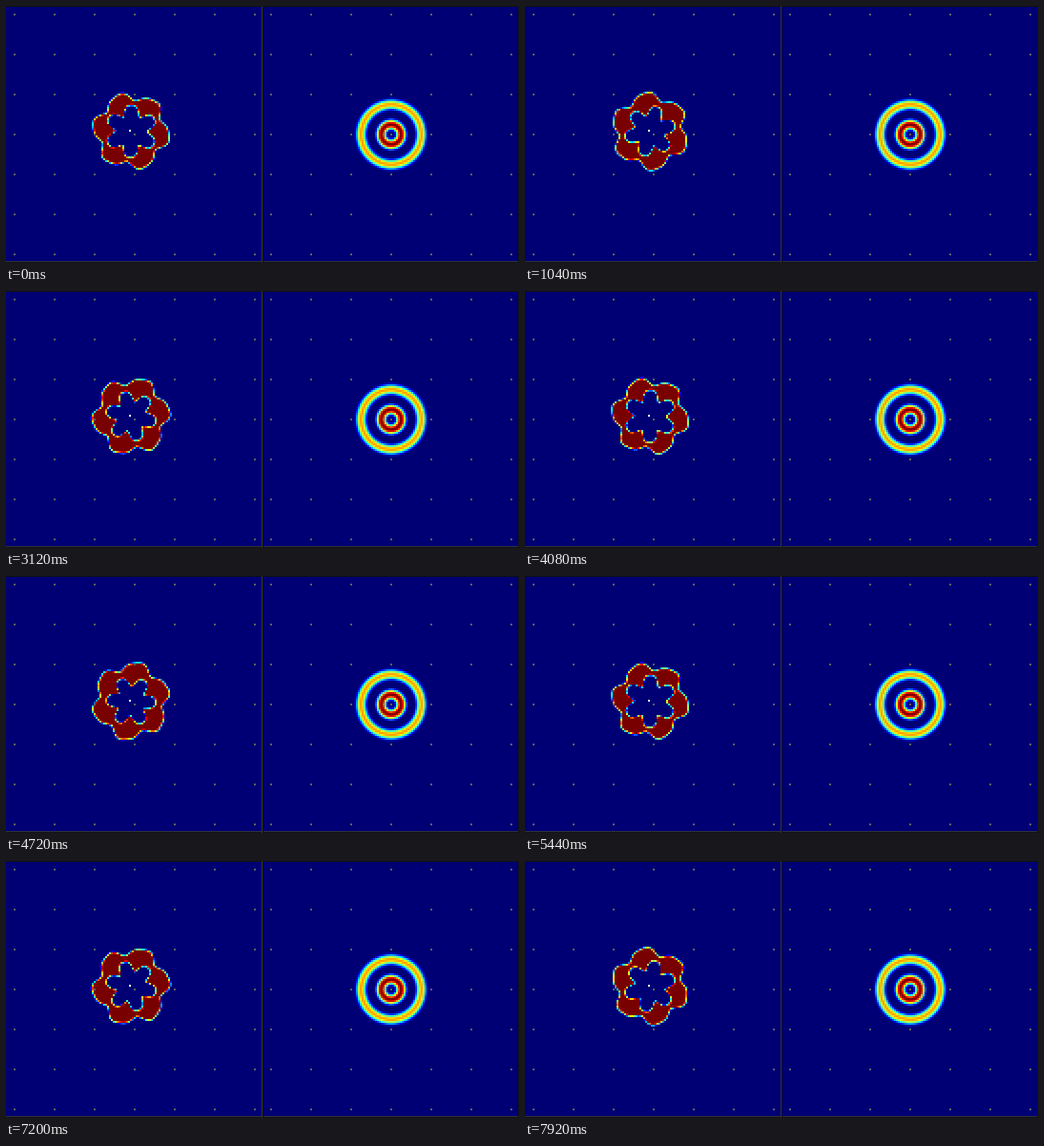
These frames come from a looping animation (538x270 px, 8000 ms). A matplotlib script:

```python
import numpy as np
import matplotlib.pyplot as plt
from matplotlib.animation import FuncAnimation
from matplotlib.colors import LinearSegmentedColormap

W, H = 538, 270
FRAMES, INTERVAL = 100, 80
CELL, CELLS = 2, 134
PANEL = 269                    # horizontal offset between the two panels
RADIUS = 42                    # kernel radius and spacing of the grid dots
STEP = np.radians(3.535)       # turn per frame
PERIOD = 17                    # frames per sixth of a turn

NAVY = (0, 0, 116)
GREY, DARK, EDGE = (95, 95, 95), (50, 50, 50), (16, 16, 24)
STOPS = [(0, 0, NAVY[2] / 255), (0, 0, 1), (0, .5, 1), (0, 1, 1),
         (.5, 1, .5), (1, 1, 0), (1, .5, 0), (1, 0, 0), (.47, 0, 0)]
HEAT = LinearSegmentedColormap.from_list("heat", STOPS, N=253)

axis = np.arange(CELLS) * CELL
X, Y = np.meshgrid(axis, axis)


def polar(cx, cy):
    """Distance and counter-clockwise angle of every cell."""
    dx, dy = X - cx, cy - Y
    return np.hypot(dx, dy), np.arctan2(dy, dx)


def paint(img, left, values):
    """Colour a cell field and enlarge it into the picture."""
    rgb = np.rint(HEAT(values)[..., :3] * 255).astype(np.uint8)
    big = rgb.repeat(CELL, axis=0).repeat(CELL, axis=1)
    img[:CELL * CELLS, left:left + CELL * CELLS] = big


def add_dots(img, left):
    for y in range(8, H, RADIUS):
        for x in range(8, PANEL, RADIUS):
            img[y:y + 2, left + x:left + x + 2] = GREY


def add_frame(img):
    img[CELL * CELLS:] = DARK
    img[0] = img[-1] = img[:, -1] = EDGE
    img[:, PANEL - 1] = DARK
    img[:, PANEL] = EDGE


def kernel():
    """Two smooth concentric rings, the outer one weaker."""
    r = polar(134, 134)[0] / RADIUS * 2
    f = np.clip(r % 1, 1e-3, 1 - 1e-3)
    bump = np.exp(4 - 1 / (f * (1 - f)))
    return bump * np.where(r < 1, 1, np.where(r < 2, 0.72, 0))


DIST, ANGLE = polar(130.2, 130.6)


def creature(i):
    """Rotating ring with six round lobes and a star-shaped hole."""
    phi = ANGLE - np.radians(50.5) - i * STEP
    thin = np.cos(2 * np.pi * i / PERIOD)
    lobe = 6 * phi
    outer = 37.5 + 4 * (np.cos(lobe) - 0.27 * np.cos(2 * lobe - 0.7))
    arm = 6 * (phi + np.radians(22))
    inner = 22.4 + 5.2 * (np.cos(arm) - 0.2 * np.cos(2 * arm)) + 0.9 * thin
    depth = np.minimum(outer - 0.3 * thin - DIST, DIST - inner)
    return np.clip(depth / 2.8 + 0.5, 0, 1)


def backdrop():
    img = np.zeros((H, W, 3), np.uint8)
    img[:] = NAVY
    paint(img, PANEL, kernel())
    add_dots(img, PANEL)
    return img


BASE = backdrop()


def render(i):
    img = BASE.copy()
    paint(img, 0, creature(i))
    add_dots(img, 0)
    img[130:132, 129:131] = 255
    add_frame(img)
    return img


fig = plt.figure(figsize=(W / 100, H / 100), dpi=100)
ax = fig.add_axes([0, 0, 1, 1])
ax.axis("off")
picture = ax.imshow(render(0), interpolation="nearest", aspect="auto")


def update(i):
    picture.set_data(render(i))
    return [picture]


anim = FuncAnimation(fig, update, frames=FRAMES, interval=INTERVAL,
                     repeat=True, repeat_delay=0, blit=False)
plt.show()
```
